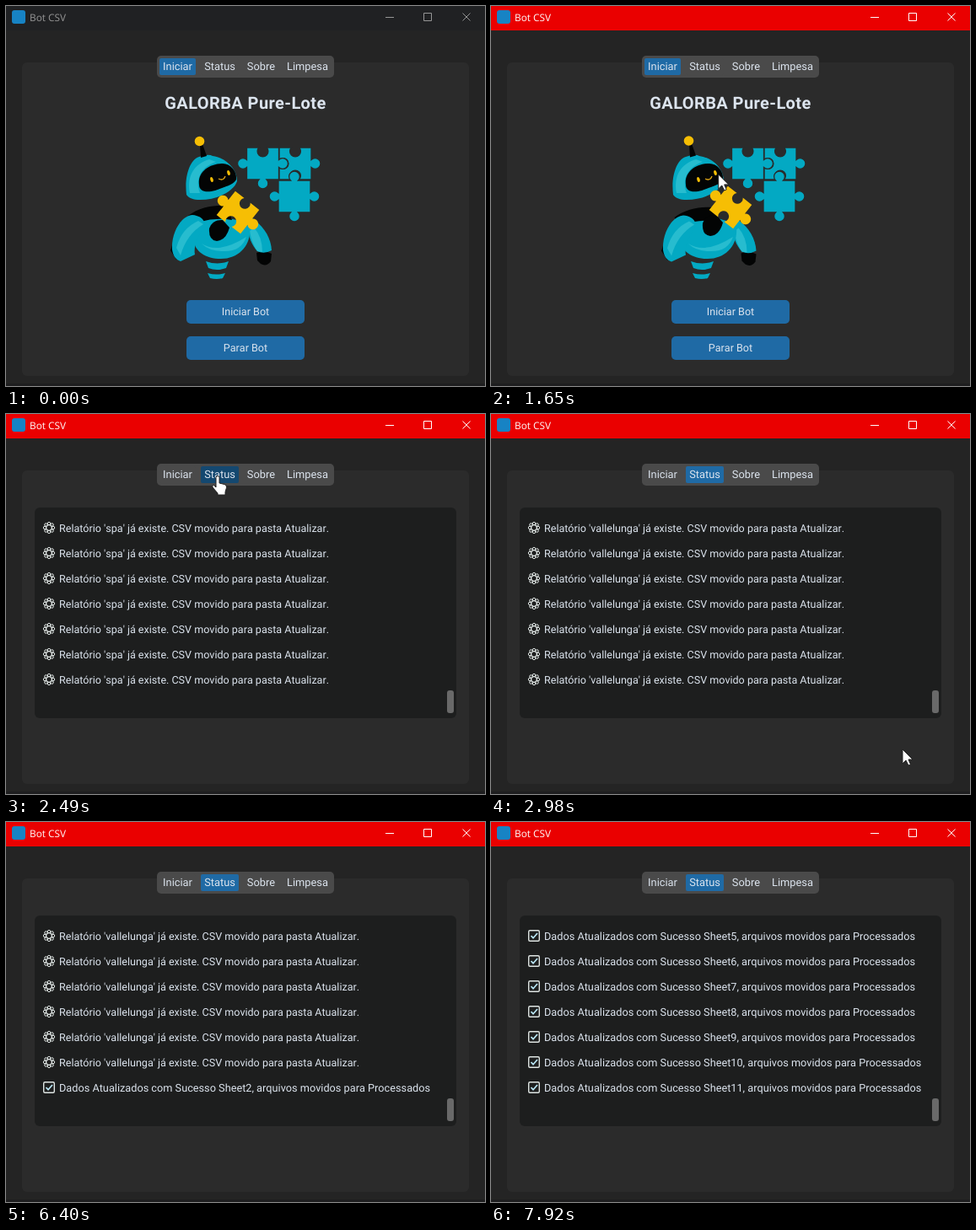
Write an HTML page that moves like this. It is 568 px wide and 451 px high and loops after 7.99 s.

```html
<!DOCTYPE html>
<html lang="pt">
<head>
<meta charset="utf-8">
<title>Bot CSV</title>
<style>
html, body { margin: 0; width: 100%; height: 100%; overflow: hidden; background: #242424; }
svg { display: block; width: 568px; height: 451px; }
text { font: 12.55px Roboto, sans-serif; font-kerning: none; fill: #dce4ee; text-rendering: geometricPrecision; white-space: pre; }
.sheet { font-size: 12.73px; }
.mid { text-anchor: middle; }
.tab { font-size: 12.85px; }
.heading { font-size: 20px; font-weight: 700; letter-spacing: .4px; font-kerning: normal; }
.caption { font: 11.8px "Open Sans", sans-serif; fill: var(--chrome); }
.controls { fill: none; stroke: var(--chrome); }
.cyan { fill: #03a9c3; }
.light { fill: #27bccf; }
.black { fill: #030404; }
.yellow { fill: #f6be04; }
.icon { fill: none; stroke: #dfe5e3; }
</style>
</head>
<body>
<svg viewBox="0 0 568 451">
  <rect width="568" height="451" fill="#242424"/>
  <rect y="448" width="568" height="3" fill="#1e1e1f"/>
  <rect id="bar" width="568" height="29"/>
  <rect x="7" y="5" width="16" height="16" rx="3" fill="#1783c4"/>
  <text class="caption" x="28" y="18">Bot CSV</text>
  <path class="controls" d="M450 13.5h10M495.5 8.5h9v9h-9zM541.5 8.5l9 9m0-9l-9 9"/>
  <rect x="19" y="67" width="530" height="372" rx="6" fill="#2b2b2b"/>
  <rect x="179" y="59" width="210" height="26" rx="5" fill="#4a4a4a"/>
  <rect id="tabStart" x="182" y="62" width="43" height="20" rx="2"/>
  <rect id="tabStatus" x="231" y="62" width="45" height="20" rx="2"/>
  <g id="tabs"></g>

  <g id="home">
    <text class="heading mid" x="284" y="122">GALORBA Pure-Lote</text>
    <g id="puzzle" class="cyan" stroke="#292b2b" stroke-width="1.3"></g>
    <path class="cyan" d="M237 303Q251 308 264 303L261 311Q250 315 240 311ZM239 317Q250 320 260 317L257 323Q250 325 242 323Z"/>
    <g data-move="-1 1">
      <path class="black" d="M297 293Q306 289 315 294L314 303Q309 310 302 306L298 302Z"/>
      <path class="cyan" d="M289 250C305 260 314 274 315 290Q306 295 298 291C289 281 284 266 289 250Z"/>
      <path class="light" d="M294 263Q304 274 304 292L298 291Q291 281 289 267Z"/>
    </g>
    <g data-move="4 0">
      <path class="cyan" d="M222 254C248 247 282 252 289 263C291 284 276 300 255 300C236 300 222 290 223 276Z"/>
      <path class="light" d="M232 282Q252 295 285 274Q279 292 257 291Q241 291 232 282Z"/>
    </g>
    <g data-move="3 4">
      <path class="black" d="M216 249C229 239 246 236 262 237L268 254Q244 250 222 259Z"/>
    </g>
    <g data-move="14 1">
      <path class="black" d="M197 284L195 290L202 301L208 300Z"/>
      <path class="cyan" d="M197 289C196 268 208 249 221 248C231 249 237 254 235 262C228 273 222 285 224 295L207 303C201 301 198 296 197 289Z"/>
      <path class="light" d="M202 287Q208 264 228 255L234 259Q214 271 207 296Z"/>
    </g>
    <g data-move="20 -12">
      <path class="black" d="M241 264Q245 253 257 254L265 263Q261 278 250 279Q240 278 241 264Z"/>
    </g>
    <g data-move="4 0">
      <path class="cyan" d="M214 224C211 199 220 181 229 179Q240 175 245 178C261 180 274 193 274 208C270 220 251 230 230 230C222 230 217 228 214 224Z"/>
      <path class="light" d="M218 222C214 201 224 187 241 182L249 185C231 191 224 206 230 222Z"/>
      <path class="black" d="M229 212C227 198 240 187 257 187C267 187 274 197 273 206C270 212 261 214 248 219C237 222 229 220 229 212Z"/>
      <ellipse class="yellow" rx="1.7" ry="3.1" transform="translate(244 206) rotate(-15)"/>
      <ellipse class="yellow" rx="1.7" ry="3.1" transform="translate(264 198) rotate(-15)"/>
      <path d="M252 205Q258 208 260 202" fill="none" stroke="#e7ac18" stroke-width="1.3"/>
    </g>
    <g data-move="10 -1">
      <path class="black" d="M230 165L233 164L238 178L231 180Z"/>
      <circle class="yellow" cx="229.5" cy="160.500" r="5.8"/>
    </g>
    <g data-move="18 -12"><path id="held" class="yellow" transform="translate(275 245) rotate(38)"/></g>
    <rect id="start" x="214" y="349" width="140" height="28" rx="5"/>
    <rect x="214" y="392" width="140" height="28" rx="5" fill="#1f6aa5"/>
    <text class="mid" x="284" y="367">Iniciar Bot</text>
    <text class="mid" x="284" y="410">Parar Bot</text>
  </g>

  <g id="status">
    <rect x="34" y="111" width="500" height="250" rx="6" fill="#1d1e1e"/>
    <rect x="523" y="328" width="8" height="27" rx="3" fill="#696969"/>
    <g id="log"></g>
  </g>

  <circle id="click" r="12" fill="#d8d52a" fill-opacity=".62"/>
  <g id="pointer" fill="#fff" stroke="#222" stroke-width="1">
    <path id="hand" d="M-2 1.5a2 2 0 0 1 4 0V8l6 1.5q3 .5 2.5 4L9 18.5V22H0v-2l-6-7q-1-3 1.5-2.5L-2 13Z"/>
    <path id="arrow" d="M0 0V17L4 13L7 19L9.5 18L7 12H12Z"/>
  </g>
</svg>
<script>
const LOOP = 7990, STEP = 70, FOCUS = 1160, OPEN = 2350, DONE = 6400;
const BLUE = '#1f6aa5', DARK = '#144870';
const $ = id => document.getElementById(id);
const show = (el, on) => el.style.display = on ? '' : 'none';

// Jigsaw outline; each side is 1 for a knob, -1 for a socket.
function jigsaw(size, sides) {
  const h = size / 2, neck = 4.5, r = 6.4;
  let path = `M${-h} ${-h}`;
  sides.forEach((kind, i) => {
    const turn = (x, y) => [[x, y], [-y, x], [-x, -y], [y, -x]][i].join(' ');
    path += `L${turn(-neck, -h)}A${r} ${r} 0 1 ${kind > 0 ? 1 : 0} ${turn(neck, -h)}L${turn(h, -h)}`;
  });
  return path + 'Z';
}

$('held').setAttribute('d', jigsaw(36, [-1, 1, -1, 1]));
$('puzzle').innerHTML = [
  [343, 187, [-1, 1, -1, -1]],
  [304.5, 187, [-1, 1, 1, 1]],
  [342, 226, [1, 1, 1, 1]]
].map(([x, y, sides]) => `<path transform="translate(${x} ${y})" d="${jigsaw(38, sides)}"/>`).join('');

$('tabs').innerHTML = [['Iniciar', 203.5], ['Status', 253.5], ['Sobre', 302.5], ['Limpesa', 357.5]]
  .map(([name, x]) => `<text class="tab mid" x="${x}" y="76">${name}</text>`).join('');

const petals = Array.from({length: 8}, (_, i) =>
  `<circle cx="5" r="1.7" transform="rotate(${i * 45})"/>`).join('');
const gear = `<g class="icon gear">${petals}<circle r="3.3"/></g>`;
const check = '<g class="icon check"><rect x="-6.3" y="-6.3" width="12.6" height="12.6" rx="1.5" stroke-width="1.4"/>' +
  '<path d="M-3.5 0L-1 2.7L4 -3" stroke="#b9e6f5" stroke-width="1.7"/></g>';

$('log').innerHTML = Array.from({length: 7}, (_, i) =>
  `<g transform="translate(51 ${135 + 30 * i})">${gear}${check}<text x="12" y="5"></text></g>`).join('');
const rows = [...$('log').children].map(row => ({
  gear: row.querySelector('.gear'), check: row.querySelector('.check'), text: row.querySelector('text')
}));
const parts = [...document.querySelectorAll('[data-move]')].map(el => ({
  el, by: el.dataset.move.split(' ').map(Number)
}));

const route = [
  [480, 545, 425], [960, 307, 369], [1300, 307, 369], [1930, 243, 79],
  [2070, 245, 79], [2490, 251, 74], [2560, 251, 74], [2980, 488, 398],
  [4099, 488, 398], [4100, 490, 408], [4170, 490, 408]
];
const smooth = p => p * p * (3 - 2 * p);

function pointerAt(t) {
  const i = Math.max(1, route.findIndex(([time]) => time > t));
  const [t0, x0, y0] = route[i - 1], [t1, x1, y1] = route[i];
  const p = smooth(Math.min(1, Math.max(0, (t - t0) / (t1 - t0))));
  return [x0 + (x1 - x0) * p, y0 + (y1 - y0) * p];
}

function drawLog(t) {
  const newer = t < 2560 ? 0 : Math.floor((t - 2560) / 60) + 1;
  const sheets = t < DONE ? 0 : Math.floor((t - DONE) / 168) + 1;
  rows.forEach((row, i) => {
    const sheet = sheets - 7 + i;
    const track = i >= 7 - newer ? 'vallelunga' : 'spa';
    const line = sheet >= 0
      ? `Dados Atualizados com Sucesso Sheet${sheet + 2}, arquivos movidos para Processados`
      : `Relatório '${track}' já existe. CSV movido para pasta Atualizar.`;
    if (row.text.textContent !== line) row.text.textContent = line;
    row.text.classList.toggle('sheet', sheet >= 0);
    show(row.gear, sheet < 0);
    show(row.check, sheet >= 0);
  });
}

function draw(t) {
  const tick = FOCUS + Math.floor((t - FOCUS) / STEP) * STEP;
  const active = t >= FOCUS, opened = t >= OPEN;
  $('bar').setAttribute('fill', active ? '#ea0000' : '#202123');
  document.documentElement.style.setProperty('--chrome', active ? '#fff' : '#969696');
  show($('home'), !opened);
  show($('status'), opened);

  const visible = t >= 480 && t < 4170;
  const [x, y] = visible ? pointerAt(tick) : [-50, -50];
  const onStart = !opened && x > 214 && x < 354 && y > 349 && y < 377;
  const onStatus = x > 231 && x < 276 && y > 62 && y < 82;
  const pressed = t >= FOCUS && t < FOCUS + 2 * STEP;
  $('start').setAttribute('fill', onStart && !pressed ? DARK : BLUE);
  $('tabStart').setAttribute('fill', opened ? '#4a4a4a' : BLUE);
  $('tabStatus').setAttribute('fill', opened ? (onStatus ? DARK : BLUE) : (onStatus ? '#696969' : '#4a4a4a'));

  show($('pointer'), visible);
  $('pointer').setAttribute('transform', `translate(${x} ${y})`);
  show($('hand'), onStart || onStatus);
  show($('arrow'), !onStart && !onStatus);
  show($('click'), pressed || (t >= 2280 && t < 2420));
  $('click').setAttribute('transform', `translate(${x - 2} ${y - 1})`);

  const reach = smooth(Math.min(1, Math.max(0, (tick - 1230) / 840)));
  parts.forEach(({el, by}) => el.setAttribute('transform', `translate(${by[0] * reach} ${by[1] * reach})`));
  if (opened) drawLog(t);
}

const began = performance.now();
function frame() {
  draw((performance.now() - began) % LOOP);
  requestAnimationFrame(frame);
}
frame();
</script>
</body>
</html>
```
